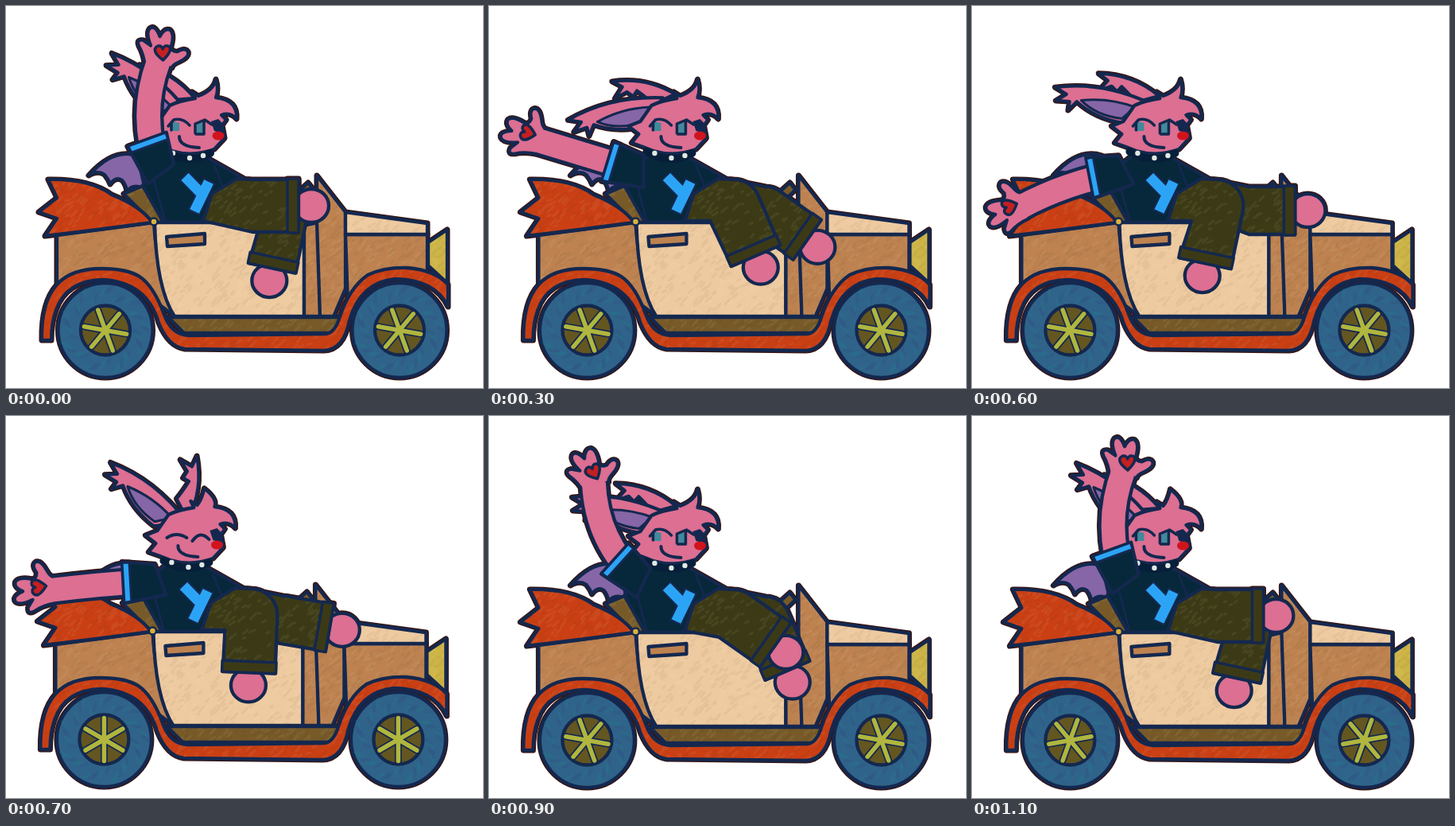
Recreate the animation shown at these times as an HTML page with a canvas. Size 600 by 480 pixels, loop 1.2 s.

```html
<!DOCTYPE html>
<html lang="en">
<head>
<meta charset="utf-8">
<title>Car ride</title>
<style>
html, body { margin: 0; width: 100%; height: 100%; overflow: hidden; background: #fff; }
canvas { display: block; }
</style>
</head>
<body>
<canvas id="stage" width="600" height="480"></canvas>
<script>
const ctx = document.getElementById('stage').getContext('2d');
const INK = '#14284f', PINK = '#dc6f92', RED = '#ca3f14', TAN = '#bd8250', CREAM = '#eecaa0',
  OLIVE = '#3c3a16', BROWN = '#775a28', SHIRT = '#06283a', BLUE = '#2ca4f6', PURPLE = '#8666a6';
const STEPS = 12, STEP_MS = 100, RAD = Math.PI / 180;

// The wave goes out in six drawings and comes back through the same six.
function poseAt(step) {
  const beat = Math.min(step, STEPS - 1 - step);
  const swing = (1 - Math.cos(Math.PI * beat / 5)) / 2;
  return {
    swing,
    reach: [2, -9, -23, -71, -93, -107][beat],
    sleeve: -20 - 81 * swing,
    lift: [1, .45, .45, 0][beat % 4],
    laugh: beat === 4
  };
}

// Faint crayon grain shared by all textured fills.
let seed = 7;
const rnd = () => (seed = seed * 16807 % 2147483647) / 2147483647;
function streaks(n) {
  const p = new Path2D();
  while (n--) {
    const x = rnd() * 600, y = 200 + rnd() * 280, l = 2 + rnd() * 5;
    p.moveTo(x, y);
    p.lineTo(x + l, y - l * (.3 + rnd()));
  }
  return p;
}
const darkGrain = streaks(1800), lightGrain = streaks(1500);

let halo;
function line(path, color = INK, width = 4) {
  if (halo) return;
  ctx.strokeStyle = color;
  ctx.lineWidth = width;
  ctx.stroke(path);
}
function oval(x, y, rx, ry = rx) {
  const p = new Path2D();
  p.ellipse(x, y, rx, ry, 0, 0, 7);
  return p;
}
function shape(path, fill, grain = false, width = 4.3) {
  if (Array.isArray(path)) path = 'M' + path.join(' ') + 'Z';
  if (typeof path === 'string') path = new Path2D(path);
  if (halo) {
    ctx.strokeStyle = '#381512';
    ctx.lineWidth = 7;
    ctx.stroke(path);
    return;
  }
  ctx.fillStyle = fill;
  ctx.fill(path);
  if (grain) {
    ctx.save();
    ctx.clip(path);
    line(darkGrain, 'rgba(70,40,0,.05)', 3);
    line(lightGrain, 'rgba(255,240,200,.06)', 3);
    ctx.restore();
  }
  if (width) line(path, INK, width);
}
function mark(path, fill) {
  if (!halo) shape(path, fill, false, 0);
}
function at(x, y, degrees, paint) {
  ctx.save();
  ctx.translate(x, y);
  ctx.rotate(degrees * RAD);
  paint();
  ctx.restore();
}

function ears({ lift, laugh }) {
  at(222, 118, 12 + 20 * lift + 67 * laugh, () =>
    shape('M12 -10Q-28 -24 -69 -9L-55 -5L-61 11L-48 0L-39 4L-36 -4Q-22 2 -12 8Z', PINK));
  shape('M165 188Q135 178 104 213Q116 206 124 212Q129 218 131 224Q138 214 146 219Q151 225 152 233Q160 222 175 230Z', PURPLE);
  at(205, 135, -9 + 51 * lift, () => {
    shape('M18 -17Q-48 -30 -104 -8L-88 -3L-99 8L-82 5L-81 16L-73 3Q-45 18 -10 15Z', PINK);
    shape('M-68 0Q-35 -12 0 -8L-13 10Q-45 14 -68 0Z', PURPLE, false, 3);
  });
}

function body() {
  shape([148,236, 172,226, 203,272, 184,272], BROWN, true);
  shape('M178 208L205 186L252 190L300 217L264 234L246 272L198 272L172 226Z', SHIRT);
  line(new Path2D('M187 222L200 270M262 200L272 225'), INK, 3);
  ctx.lineCap = 'butt';
  const cross = new Path2D('M224 213L248 238M256 219L236 260');
  line(cross, INK, 17);
  line(new Path2D('M225 214.500L247 237M255 221L237 258'), BLUE, 13);
  ctx.lineCap = 'round';
}

function head(step, laugh) {
  const tip = step % 3 ? 251 : 264;
  shape(`M192 145L177 151L190 161L181 172Q196 177 208 182Q235 190 262 180L275 166L272 150L277 143
    L271 137Q282 133 290 142Q292 118 264 115Q268 105 ${tip} 92Q${tip - 3} 106 242 113
    L234 108L238 116Q218 119 206 125Z`, PINK);
  line(new Path2D('M200 183Q230 200 257 185'), '#071f3a', 10);
  for (const [x, y] of [[210,185], [231,191], [248,188]]) mark(oval(x, y, 3.2), '#dfe8e2');
  mark('M258 145L267 142L275 150L272 160L262 157Z', INK);
  if (laugh) {
    line(new Path2D('M204 154Q216 146 229 154M236 158Q246 144 257 156'));
  } else {
    mark('M209 145L218 147V157H209Z', '#3f8a9c');
    mark('M240 148L249 146V161H240Z', '#3f8a9c');
    line(new Path2D('M204 151L211 143Q222 140 231 150M208 146V156M238 160V148L250 143L259 149M249 146V161H239'), INK, 3.5);
  }
  line(new Path2D('M218 164Q218 177 243 178'));
  mark(oval(267, 163, 7.5, 5.5), '#d0141d');
}

function spokes(color, width) {
  const p = new Path2D();
  for (let a = 0; a < 360; a += 60) {
    p.moveTo(0, 0);
    p.lineTo(27 * Math.sin(a * RAD), 27 * Math.cos(a * RAD));
  }
  line(p, color, width);
}

function wheel(x, turn) {
  at(x, 407.5, 0, () => {
    shape(oval(0, 0, 59.5), '#306389');
    for (let i = 0; i < 46; i++) {
      const a = i * 2.4, r = 35 + i * 7 % 16, streak = new Path2D();
      streak.moveTo(r * Math.cos(a), r * Math.sin(a));
      streak.lineTo((r + 7) * Math.cos(a + .1), (r + 7) * Math.sin(a + .1));
      line(streak, i % 2 ? 'rgba(30,130,145,.2)' : 'rgba(50,70,130,.2)', 4);
    }
    shape(oval(0, 0, 31), '#645620');
  });
  at(x, 407.5, turn, () => {
    spokes(INK, 9);
    spokes('#b0b63e', 5.5);
  });
}

function car(step) {
  shape('M64 288L186 272Q190 340 212 390L150 342L64 348Z', TAN, true);
  shape('M53 218Q106 217 133 237Q170 252 184 272Q110 282 49 289L64 267L41 259L64 241Z', RED, true);
  shape([360,240, 380,222, 387,231, 370,247], BROWN);
  shape('M187 272H375V390H212Q189 355 187 272Z', CREAM, true);
  shape([375,276, 393,272, 395,390, 375,390], TAN, true);
  shape([391,213, 427,259, 427,355, 412,390, 395,390, 391,272], TAN, true);
  shape([427,287, 530,287, 530,335, 470,335, 430,375], TAN, true);
  shape([427,259, 530,273, 530,287, 427,287], CREAM, true);
  shape([531,297, 555,281, 555,348, 531,326], '#cdb447', true);
  shape([202,290, 250,286, 250,299, 203,302], TAN);
  shape('M204 391H424L410 411H224Z', BROWN, true);
  shape(`M45 420Q44 372 64 350Q82 330 120 330Q152 330 168 340Q186 352 199 388Q208 413 230 414L402 412
    Q414 411 420 390Q432 354 455 338Q476 328 505 329Q540 332 556 350V378Q540 344 490 343
    Q446 347 432 395Q425 432 400 433L225 431Q204 428 192 398Q177 347 122 344
    Q76 345 63 382Q57 398 57 420Z`, RED, true);
  const turn = (step % 3 - 1) * 20;
  wheel(125, turn);
  wheel(495, turn);
  shape(oval(186, 271, 4.5), '#d8b23e', false, 2.5);
}

// Shin swings about the knee; bend 0 points it forward, 1 down.
function leg(kneeX, kneeY, half, bend, hip) {
  const angle = 102 * bend, length = 74 + 16 * bend, p = new Path2D(hip);
  const u = Math.cos(angle * RAD), v = Math.sin(angle * RAD);
  const spot = (along, side) => [kneeX + along * u + side * v, kneeY + along * v - side * u];
  const crook = spot(0, -half);
  shape(oval(...spot(length, 0), 22, 21), PINK);
  p.arc(kneeX, kneeY, half, -90 * RAD, (angle - 90) * RAD);
  p.lineTo(...spot(length - 16, half));
  p.lineTo(...spot(length - 16, -half));
  p.lineTo(crook[0], Math.max(crook[1], 270));
  p.closePath();
  shape(p, OLIVE, true);
  at(kneeX, kneeY, angle, () =>
    shape(`M${length - 30} ${-half - 1}H${length - 16}V${half + 1}H${length - 30}Z`, OLIVE, false, 3.5));
}

function arm({ reach, sleeve }) {
  const x = 192, y = 208, width = 34;
  const polar = (deg, r) => [x + r * Math.sin(deg * RAD), y - r * Math.cos(deg * RAD)];
  const [hx, hy] = polar(reach, 150), turn = (reach - 4) * RAD;
  // palm centre, a little off the heart
  const wx = hx - 6 * Math.cos(turn) - 12 * Math.sin(turn), wy = hy - 6 * Math.sin(turn) + 12 * Math.cos(turn);
  const limb = new Path2D(`M${x} ${y}Q${polar(sleeve, 75).join(' ')} ${wx} ${wy}`);
  ctx.lineCap = 'butt';
  if (halo) {
    ctx.strokeStyle = '#381512';
    ctx.lineWidth = width + 7;
    ctx.stroke(limb);
  }
  line(limb, INK, width + 4.3);
  at(hx, hy, reach - 4, () =>
    shape(`M-23 18Q-24 2 -30 -9Q-33 -18 -24 -16L-15 -9Q-21 -26 -15 -31Q-8 -35 -3 -20
      Q3 -31 10 -28Q16 -23 11 -7Q10 -1 18 0Q29 -6 32 1Q33 8 20 13Q12 16 11 20Z`, PINK));
  line(limb, PINK, width - 4.3);
  ctx.lineCap = 'round';
  at(hx, hy, reach - 4, () =>
    shape('M0 10Q-16 -3 -6 -8Q-1 -9 0 -4Q3 -10 8 -7Q13 -2 0 10Z', '#c51f22', false, 3.5));
  at(x, y, sleeve, () => {
    shape('M-26 -43H26L21 -2L-18 10Z', SHIRT);
    shape('M-25 -43H25V-34H-24Z', BLUE, false, 3);
  });
}

function draw(step) {
  const pose = poseAt(step);
  ctx.setTransform(1, 0, 0, 1, 0, 0);
  ctx.fillStyle = '#fff';
  ctx.fillRect(0, 0, 600, 480);
  ctx.lineJoin = ctx.lineCap = 'round';
  ctx.translate(-.8 * Math.min(step, 2), step % 3 === 1 ? -1 : 0);
  for (halo of [true, false]) {
    ears(pose);
    body();
    head(step, pose.laugh);
    car(step);
    leg(350, 257, 30, 1 - pose.swing, 'M305 270V218');
    leg(310, 251, 33, pose.swing, 'M248 270L259 236L290 217');
    arm(pose);
  }
}

let shown = -1;
function tick(now) {
  const step = Math.floor(now / STEP_MS) % STEPS;
  if (step !== shown) draw(shown = step);
  requestAnimationFrame(tick);
}
draw(0);
requestAnimationFrame(tick);
</script>
</body>
</html>
```
